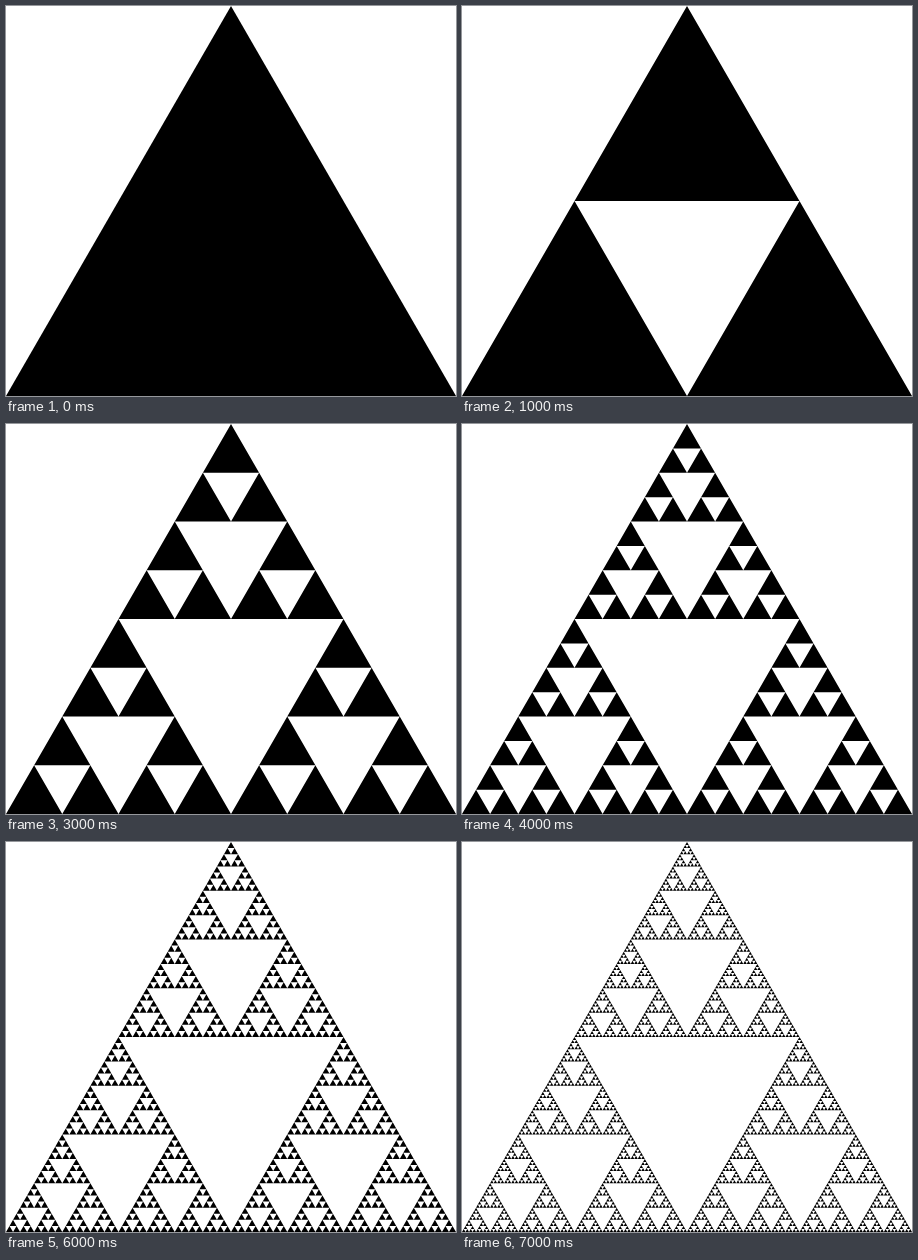
Animation, 450 px wide and 390 px high, one loop 10 s. Source, as an HTML page:

```html
<!DOCTYPE html>
<html lang="en">
<head>
<meta charset="utf-8">
<title>Sierpinski triangle</title>
<style>
  html, body { margin: 0; width: 100%; height: 100%; overflow: hidden; background: #fff; }
  svg { display: block; width: 450px; height: 390px; }
</style>
</head>
<body>
<svg viewBox="0 0 450 390"><path id="shape" fill="#000"/></svg>
<script>
  const WIDTH = 450, HEIGHT = 390;
  const LOOP = 10000, STEP = 1000, MAX_DEPTH = 7;
  const shape = document.getElementById('shape');

  // Triangle with its apex at (x, y), split into three until depth runs out.
  function sierpinski(x, y, w, h, depth) {
    if (depth === 0) return `M${x} ${y}l${w / 2} ${h}h${-w}z`;
    const next = (dx, dy) => sierpinski(x + dx, y + dy, w / 2, h / 2, depth - 1);
    return next(0, 0) + next(-w / 4, h / 2) + next(w / 4, h / 2);
  }

  const stages = Array.from({ length: MAX_DEPTH + 1 }, (_, depth) =>
    sierpinski(WIDTH / 2, 0, WIDTH, HEIGHT, depth));

  let shown = -1;
  function render(time) {
    const depth = Math.min(MAX_DEPTH, Math.floor((time % LOOP) / STEP));
    if (depth === shown) return;
    shown = depth;
    shape.setAttribute('d', stages[depth]);
  }

  const start = performance.now();
  function tick() {
    render(performance.now() - start);
    requestAnimationFrame(tick);
  }
  tick();
</script>
</body>
</html>
```
